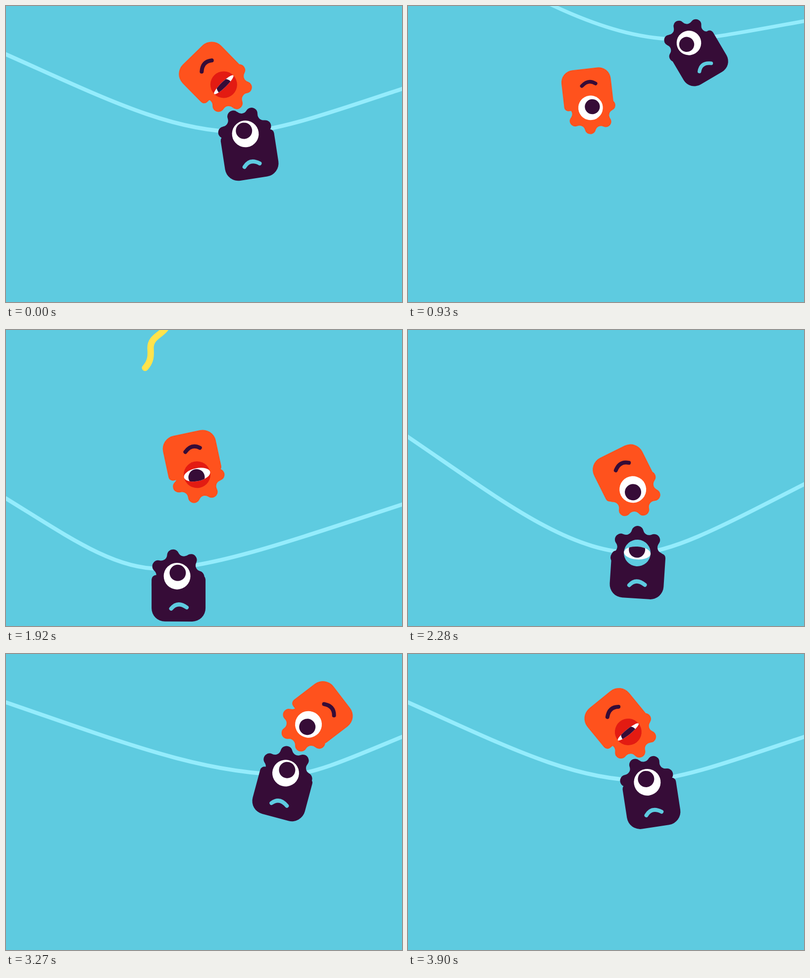
Animation, 800 px wide and 600 px high, one loop 3930 ms. Source, as an HTML page with a canvas:

```html
<!DOCTYPE html>
<html>
<head>
<meta charset="utf-8">
<title>Tightrope</title>
<style>
  html, body { margin: 0; width: 100%; height: 100%; overflow: hidden; background: #5ecbe0; }
  canvas { display: block; }
</style>
</head>
<body>
<canvas id="stage" width="800" height="600"></canvas>
<script>
const ctx = document.getElementById('stage').getContext('2d');
const LOOP = 3930, IMPACT = 2130, SEATED = 2190, HOP_END = 2760, RAD = Math.PI / 180;
const SKY = '#5ecbe0', ROPE = '#94ecfc', DARK = '#360c37', ORANGE = '#ff521d', LID = '#e31b12';
const YELLOW = '#ffe34c', CYAN = '#24e3ff', RED = '#d91a00';

// Smooth curve through a few [time, value] points that never overshoots.
function track(...p) {
  const n = p.length - 1;
  const slope = i => (p[i + 1][1] - p[i][1]) / (p[i + 1][0] - p[i][0]);
  const tangent = i => {
    const a = slope(Math.max(i - 1, 0)), b = slope(Math.min(i, n - 1));
    return a * b > 0 ? 2 * a * b / (a + b) : 0;
  };
  return t => {
    let i = 0;
    while (i < n - 1 && t >= p[i + 1][0]) i++;
    const h = p[i + 1][0] - p[i][0], u = (t - p[i][0]) / h, w = 1 - u;
    return p[i][1] * w * w * (1 + 2 * u) + p[i + 1][1] * u * u * (3 - 2 * u)
      + h * u * w * (tangent(i) * w - tangent(i + 1) * u);
  };
}

const zoom = track([0, 1], [600, .975], [1380, .85], [1920, 1], [LOOP, 1]);

// A rope end accelerates away upwards, then comes back from below and rests.
function ropeEnd(rest, rise, entry, late) {
  const arrive = track([1500, 900], [1920, entry], [2280, late], [2700, rest], [LOOP, rest]);
  return t => t < 1450 ? rest - rise * (t / 600) ** 2.3 : arrive(t);
}
const ropeLeft = ropeEnd(98, 93, 342, 217);
const ropeRight = ropeEnd(168, 50, 354, 313);
const ropeSlip = track([0, -4], [600, -5], [1920, -15], [2280, 0], [3270, 3], [LOOP, -4]);

const catcher = {
  x: track([0, 483.5], [600, 538], [1200, 580], [1500, 320], [1920, 345.5], [2280, 463],
    [3270, 565], [3780, 483], [LOOP, 483.5]),
  rot: track([0, -8.7], [600, -35], [1920, 0], [2280, 3.7], [3270, 15], [3780, -8.7], [LOOP, -8.7]),
  hair: track([0, -13], [600, 14.6], [1920, 2], [2280, 10], [3270, 0], [3780, -13], [LOOP, -13]),
  blinks: [2330, 3560], gaze: 7,
  skin: DARK, lid: SKY, mouthColor: SKY, bottom: 92, hairY: 0,
  mouth: 'M-12 66Q1 50 19.5 63.5'
};

const jumper = {
  rot: track([0, 136], [600, -45], [1380, -385], [1920, -552], [2280, -566.5], [3270, -487.5],
    [3900, -579], [LOOP, -584]),
  hair: track([0, 23], [1380, 20], [1920, 34], [2280, 12], [3270, 29], [LOOP, 23]),
  blinks: [3915, 705, 1970], gaze: 5.5,
  skin: ORANGE, lid: LID, mouthColor: DARK, bottom: 87, hairY: -3,
  mouth: 'M-17 52Q-2 64 13.5 50'
};

// The rope sags below its chord, less so to the right, and rings after the landing.
function catcherAt(t) {
  const x = catcher.x(t), l = ropeLeft(t), age = t - IMPACT;
  const ring = age > 0 ? 117 * Math.exp(-age / 400) * Math.sin(age / 200 * Math.PI) : 0;
  return [x, l + (ropeRight(t) - l) * x / 800 + 119 - .24 * (x - 483.5) + ring];
}

// Riding on the other head: one small hop, then rolling from side to side.
const roll = track([SEATED, -5], [2280, -4], [3270, 25], [3900, -20.6], [LOOP, -23.5]);
function seat(t) {
  const [x, y] = catcherAt(t), a = roll(t) * RAD;
  const u = (t - SEATED) / (HOP_END - SEATED);
  const d = 109 + (u < 1 ? 150 * u * (1 - u) : 0);
  return [x + d * Math.sin(a), y - d * Math.cos(a)];
}

const off = seat(LOOP), land = seat(SEATED);
const fallX = track([0, off[0]], [600, 346], [1380, 405], [1920, 386], [SEATED, land[0]]);
const fallY = track([0, off[1]], [600, 210.5], [1380, 200], [1920, 293], [SEATED, land[1]]);
const jumperAt = t => t < SEATED ? [fallX(t), fallY(t)] : seat(t);

const curl = new Path2D('M0 0C-8 14-32 18-31 42C-30 56-30 68-42 81');
const wave = new Path2D('M0 0C-2 24 15 24 14 45C13 62 0 64 1 85C2 104 15 104 14 124');
const chip = new Path2D('M-1-7L-7 5.5L7 4.5Z');

const confetti = [
  { shape: curl, color: YELLOW, x: 416, y: 114, at: 1380, speed: 1.9 },
  { shape: wave, color: CYAN, x: 475, y: 77, at: 1380, speed: 1.9 },
  { shape: chip, color: RED, x: 540, y: 148, at: 1380, speed: 1.9 },
  { shape: curl, color: YELLOW, x: 323, y: -3, at: 1920, speed: 1.2 }
];
let seed = 7;
const random = () => (seed = seed * 16807 % 2147483647) / 2147483647;
for (let i = 0; i < 5; i++) {
  confetti.push({
    shape: [wave, chip, curl][i % 3], color: [CYAN, RED, YELLOW][i % 3],
    x: 80 + 640 * random(), y: 300, at: 1560 + 120 * random(), speed: 1.9
  });
}

function drawConfetti(t, s) {
  for (const { shape, color, x, y, at, speed } of confetti) {
    ctx.save();
    ctx.translate(x, y - speed * (t - at));
    ctx.scale(s, s);
    ctx.strokeStyle = ctx.fillStyle = color;
    ctx.lineWidth = 13;
    if (shape === chip) {
      ctx.rotate((t - at) * .004);
      ctx.fill(shape);
      ctx.lineWidth = 9;
    }
    ctx.stroke(shape);
    ctx.restore();
  }
}

function drawRope(t, headX, headY, s) {
  const slip = ropeSlip(t), x = headX + 2.4 * slip, y = headY + slip;
  const l = ropeLeft(t), r = ropeRight(t), dl = y - l, dr = y - r, w = 800 - x;
  ctx.beginPath();
  ctx.moveTo(0, l);
  ctx.bezierCurveTo(x * .41, l + dl * .55, x * .7, y, x, y);
  ctx.bezierCurveTo(x + w * .22, y, 800 - w * .43, r + dr * .53, 800, r);
  ctx.strokeStyle = ROPE;
  ctx.lineWidth = 8 * s;
  ctx.lineCap = 'square';
  ctx.stroke();
  ctx.lineCap = 'round';
}

// Seven round teeth joined by equally round hollows.
function drawHair(cy, turn) {
  const step = 2 * Math.PI / 7, bend = 1.334;
  ctx.beginPath();
  for (let i = 0; i < 7; i++) {
    const a = turn + i * step, m = a + step / 2;
    ctx.arc(43 * Math.cos(a), cy + 43 * Math.sin(a), 12, a - bend, a + bend);
    ctx.arc(54 * Math.cos(m), cy + 54 * Math.sin(m), 12, a + bend + Math.PI, a + step - bend + Math.PI, true);
  }
  ctx.fill();
}

function openness(blinks, t) {
  const gaps = blinks.map(c => Math.abs(t - c)).map(g => Math.min(g, LOOP - g));
  const u = Math.min(1, Math.min(...gaps) / 130);
  return .15 + .85 * Math.sin(u * Math.PI / 2) ** 1.6;
}

function disc(x, y, rx, ry, color) {
  ctx.beginPath();
  ctx.ellipse(x, y, rx, ry, 0, 0, 7);
  ctx.fillStyle = color;
  ctx.fill();
}

function drawMonster(m, t, [x, y], [targetX, targetY], s) {
  const rot = m.rot(t) * RAD;
  ctx.save();
  ctx.translate(x, y);
  ctx.rotate(rot);
  ctx.scale(s, s);

  ctx.fillStyle = m.skin;
  drawHair(m.hairY, m.hair(t) * RAD);
  ctx.beginPath();
  ctx.roundRect(-51.5, -2, 109, m.bottom + 2, [9, 9, 27, 27]);
  ctx.fill();

  ctx.strokeStyle = m.mouthColor;
  ctx.lineWidth = 8;
  ctx.stroke(new Path2D(m.mouth));

  const open = openness(m.blinks, t);
  if (open < 1) disc(0, 0, 27, 27, m.lid);
  disc(0, 0, 27, 27 * open, '#fff');
  ctx.clip();
  // each one watches the other
  const dx = targetX - x, dy = targetY - y, look = Math.atan2(dy, dx) - rot;
  const g = m.gaze * Math.min(1, 200 / Math.hypot(dx, dy));
  disc(g * Math.cos(look), g * Math.sin(look), 16.5, 16.5, DARK);
  ctx.restore();
}

function draw(t) {
  const s = zoom(t), c = catcherAt(t), j = jumperAt(t);
  ctx.fillStyle = SKY;
  ctx.fillRect(0, 0, 800, 600);
  ctx.lineCap = ctx.lineJoin = 'round';
  drawConfetti(t, s);
  drawRope(t, c[0], c[1], s);
  drawMonster(catcher, t, c, j, s);
  drawMonster(jumper, t, j, c, s);
}

function loop() {
  draw(performance.now() % LOOP);
  requestAnimationFrame(loop);
}
loop();
</script>
</body>
</html>
```
